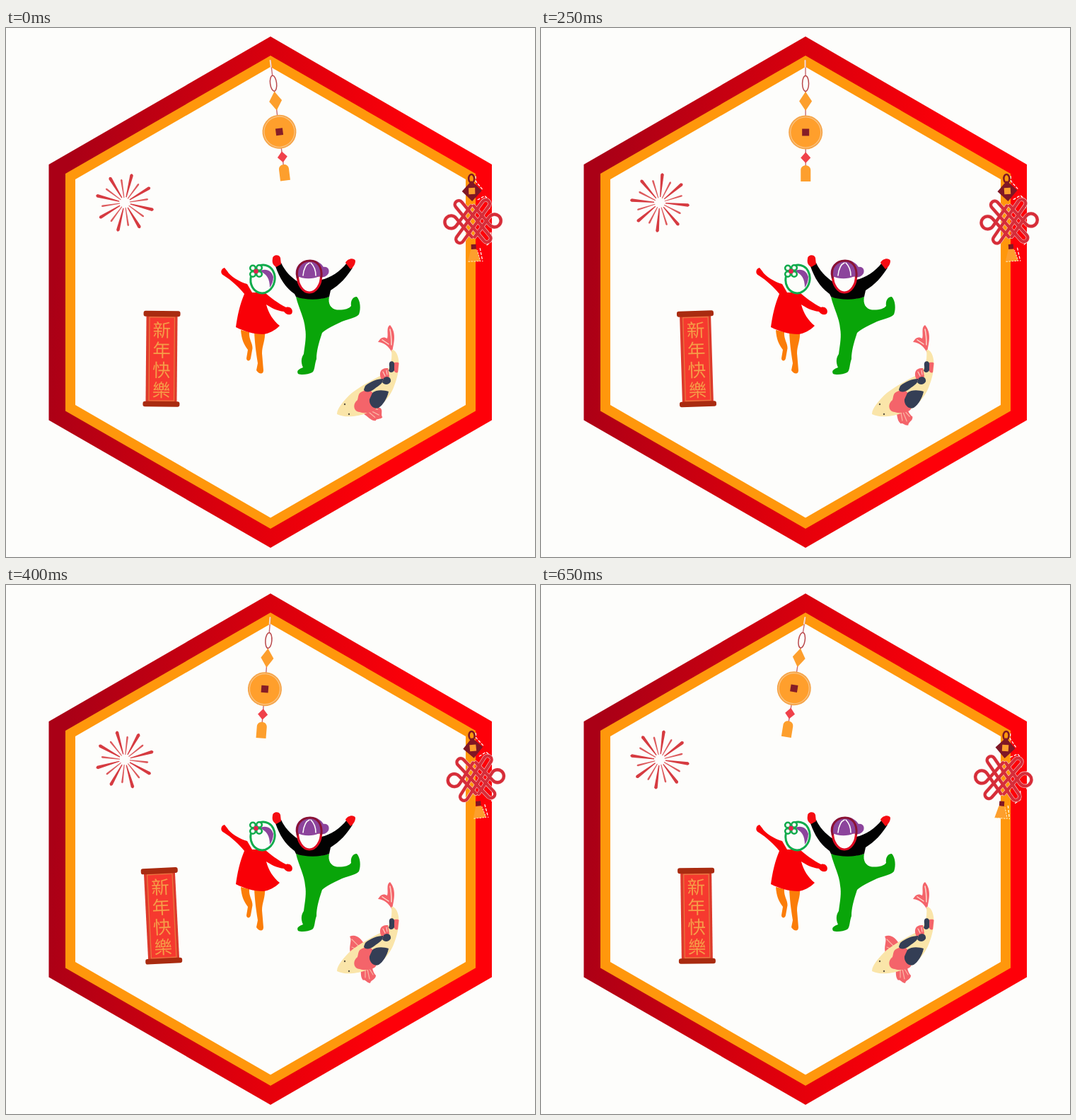
These frames come from a looping animation (748 px wide and 748 px high, 0.75 s). An HTML page:

```html
<!DOCTYPE html>
<html lang="zh-Hant">
<head>
<meta charset="utf-8">
<title>New year hexagon</title>
<style>
html, body { margin: 0; width: 100%; height: 100%; overflow: hidden; background: #fdfdfb; }
svg { display: block; width: 100vw; height: 100vh; }
text { font: 500 25.5px "Noto Sans CJK TC", "Noto Sans CJK", "Noto Sans CJK SC", sans-serif; text-anchor: middle; fill: #f59d48; }
</style>
</head>
<body>
<svg viewBox="0 0 748 748" stroke-linecap="round" stroke-linejoin="round">
  <defs>
    <linearGradient id="red" gradientUnits="userSpaceOnUse" x1="70" y1="340" x2="560" y2="400">
      <stop offset="0" stop-color="#aa0016"/>
      <stop offset=".6" stop-color="#de000c"/>
      <stop offset="1" stop-color="#fe0009"/>
    </linearGradient>
  </defs>

  <path fill="url(#red)" d="M374 12 687 193V554.500L374 735 60.500 554.500V193Z"/>
  <path fill="#ff970c" d="M374 39 664 206V541.500L374 708 84 541.500V206Z"/>
  <path fill="#fdfdfb" d="M374 55 650 214V533L374 692.500 98 533V214Z"/>

  <g id="firework" fill="#d63b41"></g>

  <g id="scroll">
    <path fill="#dd3a2b" d="M198 404H242V532H198Z"/>
    <path fill="#f6392f" stroke="#e9783f" stroke-width="1.3" d="M202.500 409H238V527H202.500Z"/>
    <g id="words"></g>
    <g fill="#a92b10">
      <rect x="194" y="400" width="52" height="8" rx="3"/>
      <rect x="194" y="528" width="52" height="7.500" rx="3"/>
    </g>
  </g>

  <!-- girl -->
  <g>
    <path fill="#fb7d09" d="M332 427 344 430C343 440 349 446 348.500 453L346 467C345 472 340 471 340 467L342 455C336 447 333 440 332 427ZM351 430 366 429C367 442 362 449 362 460L364 484C364 490 358 490 354 484L356 474C353 455 352 446 351 430Z"/>
    <path fill="#f90007" d="M313 344C317 351 330 359 341 362L348 374H366C374 381 384 389 396 395 402 393 407 399 404 404 400 407 395 404 393 401 383 400 374 395 368 391 371 403 378 414 387 421 380 428 372 432 364 433 350 433 337 429 325 423 327 407 331 390 337 376 329 366 319 357 308 350 302 347 304 340 309 339Z"/>
    <g transform="rotate(12 363 355)">
      <ellipse cx="363" cy="355" rx="17" ry="20" fill="#fdfdfb"/>
    </g>
    <path fill="#8c449c" d="M358 344C367 339 376 343 378 352 378 358 376 363 373 367 373 355 369 347 358 344Z"/>
    <ellipse cx="363" cy="355" rx="17" ry="20" fill="none" stroke="#10ab4c" stroke-width="3" transform="rotate(12 363 355)"/>
    <g fill="#fdfdfb" stroke="#10ab4c" stroke-width="2.600">
      <circle cx="349" cy="339.500" r="3.800"/><circle cx="358" cy="339" r="3.800"/>
      <circle cx="349" cy="348" r="3.800"/><circle cx="358" cy="348" r="3.800"/>
    </g>
    <circle cx="353.500" cy="344" r="3.200" fill="#e5204f"/>
  </g>

  <!-- boy -->
  <g>
    <path fill="#09a509" d="M410 380C424 384 445 384 457 380 455 390 459 397 468 398.500 478 399 485 397 488 393 487 386 490 380 496 380 501 385 502 397 499 405 494 411 482 411 471 417 461 422 452 426 447 431 442 446 439 457 439 468 436 476 437 484 433 487 427 490 418 491 413 489 410 484 415 482 420 480 417 473 417 467 421 461 423 446 425 436 423 425 422 410 414 397 410 380Z"/>
    <path fill="#020202" d="M381 337 389 332C395 345 404 353 413 359L446 356C459 353 472 345 482 332L490 339C482 352 472 363 459 371L457 380C444 385 423 385 410 380L408 376C395 367 387 354 381 337Z"/>
    <path fill="#f50c12" d="M377 326C377 321 386 319 388 325L389 334 382 338C377 335 376 331 377 326ZM480 332C482 326 492 324 494 329 494 335 490 339 487 341Z"/>
    <path fill="#fdfdfb" stroke="#df0b22" stroke-width="3.200" d="M412.500 350C412 363 420 374 429 374 438 374 446 363 445.500 350Z"/>
    <path fill="#8c449c" d="M410 350C408 336 418 328 430 328 440 328 446 333 449 338 455 337 458 342 456 347 452 353 447 353 443 351 432 356 420 355 410 350Z"/>
    <path fill="none" stroke="#8b1232" stroke-width="3" d="M412 353C409 338 418 329 430 329 441 329 447 338 446 352"/>
    <path fill="none" stroke="#fdfdfb" stroke-width="1.600" d="M420 350C421 341 424 334 429 332M438 350C438 341 434 335 431 332"/>
  </g>

  <!-- koi -->
  <g>
    <g id="sideFin">
      <path fill="#f4646a" d="M509 512C502 498 494 493 486 497 490 503 484 511 487 520L502 520Z"/>
      <path fill="none" stroke="#fbb7a5" stroke-width="1.200" d="M501 513 489 501M499 516 489 512"/>
    </g>
    <g id="lowFin">
      <path fill="#f4646a" d="M501 537C503 547 500 553 505 559 508 557 510 563 515 563 516 558 523 558 523 552 519 548 518 542 517 536Z"/>
      <path fill="none" stroke="#fbb7a5" stroke-width="1.200" d="M508 543 508 555M511 543 514 557M514 543 519 551"/>
    </g>
    <path fill="#f4646a" d="M546 459C548 446 553 432 543 420 537 423 541 433 539 439 534 436 530 437 526 444 535 445 541 450 546 459Z"/>
    <path fill="none" stroke="#fdd9cc" stroke-width="1.500" d="M543 426C545 435 545 442 545 448M532 441 541 447"/>
    <path fill="#fae5a9" d="M545 455C550 454 554 461 555 469 557 483 552 500 546 513 538 528 526 540 511 544 499 549 480 552 468 546 468 538 477 527 489 516 501 507 515 499 529 492 541 486 547 474 545 455Z"/>
    <path fill="#f4646a" d="M547 474C550 473 554 472 555.500 474L554 487C550 489 547 484 547 474ZM506 513C513 508 523 516 520 526 518 534 527 537 521 541 515 545 505 545 500 543 492 543 489 532 497 526 499 520 497 516 506 513Z"/>
    <path fill="#f4646a" d="M530 495C527 487 530 480 540 481L542 493 534 500Z"/>
    <path fill="none" stroke="#fdd9cc" stroke-width="1.100" d="M533 486 536 492M538 484 539 490"/>
    <g fill="#343e55">
      <path d="M543 472C547 470 550 473 549 478L549 484C547 488 542 488 541 484 544 480 540 476 543 472Z"/>
      <path d="M534 495C539 491 545 494 544 500 541 505 535 505 532 501Z"/>
      <path d="M508 506C515 500 525 496 533 496 534 503 525 507 520 511 514 516 506 515 506 511Z"/>
      <path d="M518 516C524 511 534 512 541 514 539 524 533 533 527 537 519 540 513 532 514 525Z"/>
    </g>
    <g fill="#5c5140"><circle cx="479" cy="532" r="1.200"/><circle cx="485" cy="546" r="1.200"/></g>
  </g>

  <g id="coin">
    <path fill="none" stroke="#c96a70" stroke-width="1.400" d="M374 46V67M374 90V124M374 170V196"/>
    <path fill="none" stroke="#f7ddd0" stroke-width="2" d="M373.500 46V55"/>
    <ellipse cx="374" cy="78.500" rx="4.500" ry="11" fill="none" stroke="#b9484b" stroke-width="1.500"/>
    <path fill="#fd9f2d" d="M374 90 383 103.500 374 117 365 103.500ZM367 217V201C367 192 381 192 381 201V217Z"/>
    <circle cx="374" cy="147.500" r="24" fill="#f5a54a"/>
    <circle cx="374" cy="147.500" r="21.500" fill="#ff9f2c" stroke="#fbc483" stroke-width="1.200"/>
    <path fill="#861d27" d="M369 142.500H379V152.500H369Z"/>
    <path fill="#f0414a" d="M374 175.500 381 183.500 374 191 367 183.500Z"/>
  </g>

  <g id="knot">
    <path fill="none" stroke="#fdfdfb" stroke-width="1.300" stroke-dasharray="3 3" d="M664 210V217L674 230M666 243 676 238 683 245 682 256M690 262 702 272 691 287M683 290 684 302 675 309M667 312 670 330"/>
    <ellipse cx="658" cy="213" rx="4" ry="6" fill="none" stroke="#7f1725" stroke-width="2.600"/>
    <path fill="#7f1725" d="M658 216 672 230.500 658 245 644 230.500Z"/>
    <path fill="#fd9f2d" d="M653.500 226H662.500V235H653.500Z"/>
    <g id="cords" transform="translate(658 273.500)" fill="none"></g>
    <path fill="#7f1725" d="M654.500 306H661.500V313H654.500Z"/>
    <path fill="#fd9f2d" d="M654 313H662L667 330H649Z"/>
    <path fill="none" stroke="#fff0c8" stroke-width="1" stroke-dasharray="2 2" d="M650 330H667L663 315"/>
  </g>
</svg>
<script>
const el = id => document.getElementById(id);
const turn = (id, angle, x, y) => el(id).setAttribute("transform", `rotate(${angle} ${x} ${y})`);

// Spark: long tapered rays with thin shorter ones between
let rays = "";
for (let i = 0; i < 16; i++) {
  const shape = i % 2
    ? `<path d="M-.5-7 .5-7 1.300-32Q0-35-1.300-32Z" fill="#dd5a5d"/>`
    : `<path d="M-.6-8 .6-8 2.300-40Q0-44-2.300-40Z"/>`;
  rays += `<g transform="translate(168 247) rotate(${i * 22.5})">${shape}</g>`;
}
el("firework").innerHTML = rays;

el("words").innerHTML = [..."新年快樂"]
  .map((c, i) => `<text x="220" y="${436.5 + i * 28.3}">${c}</text>`).join("");

const ear = "M-2 22-23.500-5.400A9 9 0 1 0-23.500 5.400L-2-22";
const cord = (stroke, width) => `<g stroke="${stroke}" stroke-width="${width}">` +
  [-52, 52].map(a => `<rect x="-36.500" y="-5.500" width="73" height="11" rx="5.500" transform="rotate(${a})"/>`).join("") +
  `<path d="${ear}"/><path d="${ear}" transform="scale(-1 1)"/></g>`;
el("cords").innerHTML = cord("#f7d5d2", 5.4) + cord("#d62d39", 4.3);

const LOOP = 750;
const starts = [0, 100, 150, 250, 350, 400, 500, 600, 650];
const swing = [0, .25, .5, 1.5, 2, 2.5, 2.5, 3, 3.5];
const knotTilt = [-1.8, -2.7, -3.6, -3.6, -4.5, -5.5, -1, 1.3, 3.6];
const scrollTilt = [.5, 0, -.45, -1.8, -2.4, -2.9, -1.5, -1.1, -.8];
const finTilt = [-50, -42, -35, -10, -4, 0, 0, 0, 0];
const finOpen = [0, 0, 0, 0, .6, 1, 1, 1, 1];

function draw(time) {
  const t = time % LOOP;
  const k = starts.filter(s => s <= t).length - 1;
  turn("coin", -7 + 4.6 * swing[k], 374, 45);
  turn("firework", 14 + 24 * swing[k], 168, 247);
  turn("knot", knotTilt[k], 658, 207);
  turn("scroll", scrollTilt[k], 220, 468);
  turn("lowFin", finTilt[k], 510, 538);
  el("sideFin").setAttribute("transform", `translate(508 518) scale(${finOpen[k]}) translate(-508 -518)`);
}

let began;
function tick(now) {
  began ??= now;
  draw(Math.max(0, now - began));
  requestAnimationFrame(tick);
}
draw(0);
requestAnimationFrame(tick);
</script>
</body>
</html>
```
